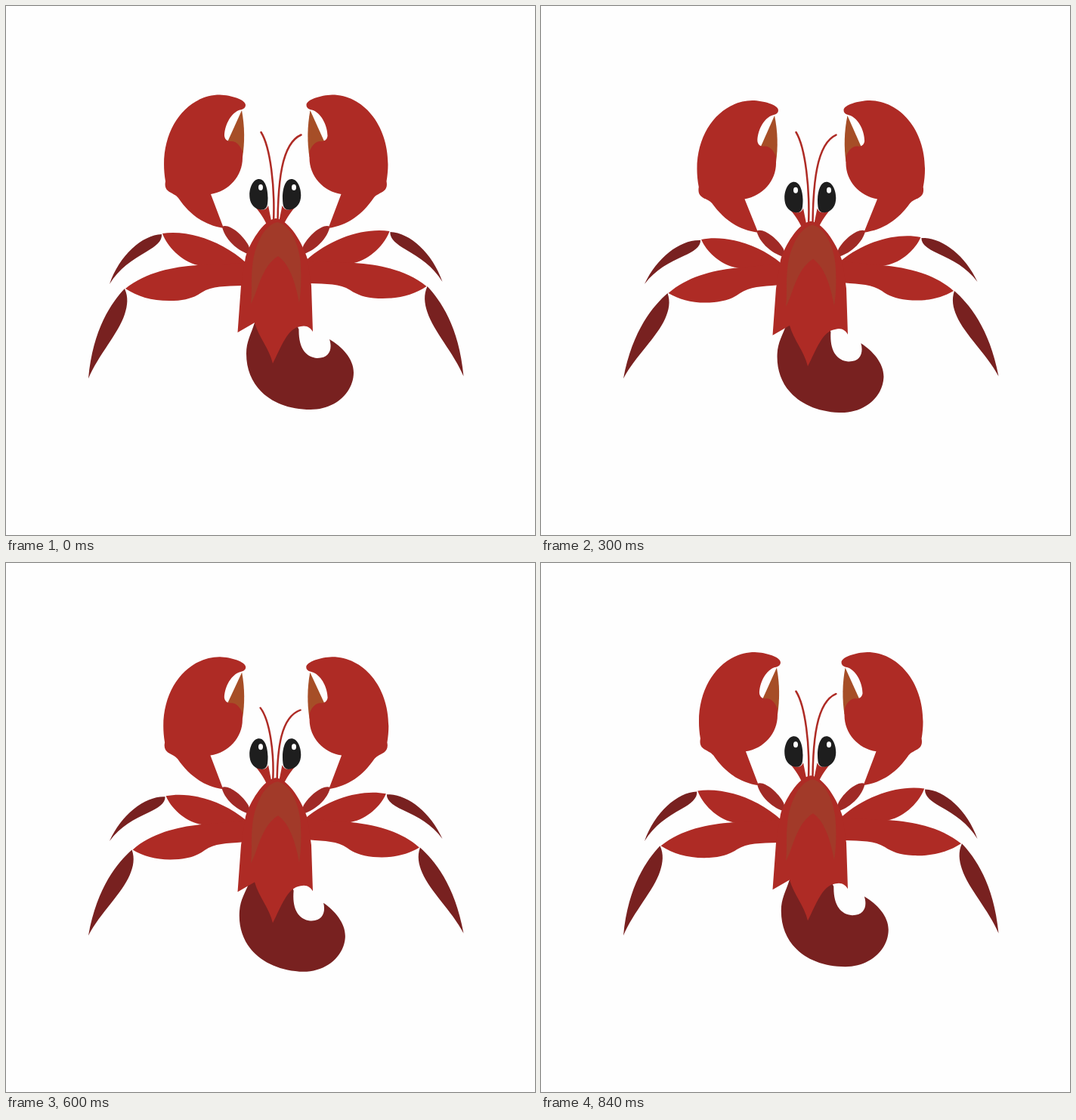
Recreate the animation shown at these times as an HTML page. Size 700 by 700 pixels, loop 0.87 s.

```html
<!DOCTYPE html>
<html lang="en">
<head>
<meta charset="utf-8">
<title>Dancing lobster</title>
<style>
  html, body { margin: 0; width: 100%; height: 100%; overflow: hidden; background: #fefefe; }
  svg { display: block; width: 100vw; height: 100vh; fill: #ae2b25; }
  .dark { fill: #782120; }
  .mirror .legs { transform: translateY(-3px); }
  .mirror .eye { transform: translateX(2px); }
</style>
</head>
<body>
<svg viewBox="0 0 700 700">
  <path id="tail" class="dark" d="M329 419C324 435 318 444 318 460C318 506 354 534 403 534C436 534 460 511 460 485C460 467 445 451 428 441C432 453 429 466 412 466C397 465 387 453 387.500 428L375 400H335Z"/>

  <g class="side">
    <g class="legs">
      <path class="thigh1" d="M207 301C240 296 285 310 318 340V360L254 343C232 338 213 318 207 301Z"/>
      <path class="thigh2" d="M158 374C185 352 222 345 253 343L318 340L313 370C290 371 273 370 259 379C250 385 240 389 222 390C195 391 175 385 158 374Z"/>
      <path class="shin1 dark" d="M206 302C180 303 150 330 137 368C150 347 167 336 186 325C198 318 207 311 206 302Z"/>
      <path class="shin2 dark" d="M157 374C140 392 115 427 109 493C122 462 149 433 157 408C161 396 162 385 157 374Z"/>
    </g>
    <g class="bob">
      <path class="arm" fill="#a02a26" d="M286 292C294 287 313 302 321 317L325 329C313 328 290 312 286 292Z"/>
    </g>
    <g class="claw">
      <path fill="#a64e27" d="M312 138L293 180L313 200C316 180 316 160 312 138Z"/>
      <path d="M211 232C200 168 237 117.500 283 117.500C298 118 317 124 317 131C317 136 312 137 308 138C296 143 289 160 289 172C290 178 294 179 297 179C304 178 310 184 313 193V201C313 225 295 245 271 249L288 294C262 290 243 276 228 254C222 246 208 248 211 232Z"/>
    </g>
  </g>

  <g id="antennae" fill="none" stroke="#ae2b25" stroke-width="2.5" stroke-linecap="round">
    <path d="M337.500 167C350 187 356 240 354 286"/>
    <path d="M390.500 170.500C364 182 360 235 359.500 286"/>
  </g>

  <g class="bob">
    <g class="side">
      <g class="eye">
        <path d="M330 266C338 271 344 271 347 264L351 284L346 292C343 283 337 275 330 266Z"/>
        <path fill="#1e1e1e" d="M335 229C326 229 321 243 322.500 254C323.500 263 330 269 337 269.500C342 270 345 268 346 262C348 246 344 229 335 229Z"/>
      </g>
    </g>
    <g fill="#fefefe">
      <ellipse cx="337" cy="240" rx="3" ry="4"/>
      <ellipse cx="381" cy="240" rx="3" ry="4"/>
    </g>
    <path d="M357 281C340 283 322 315 317 332L311 370L306.500 432L329 419C335 440 348 452 353 473C364 452 372 426 390 424C398 422 403 426 406 431L404 370L399 335C393 315 375 283 357 281Z"/>
    <path fill="#a23a29" d="M359 286C340 290 328 320 326 345C324 360 326 375 324 394C333 380 337 345 360 331C376 342 384 370 388 393C390 380 391 365 390 345C390 325 380 290 359 286Z"/>
  </g>
</svg>
<script>
const LOOP = 870, STEP = 30;
const TILT = [[0, 0], [120, -0.7], [240, -1], [360, -0.8], [600, 0.25], [720, 0], [LOOP, 0]];

for (const side of document.querySelectorAll('.side')) {
  const twin = side.cloneNode(true);
  twin.setAttribute('class', 'mirror');
  twin.setAttribute('transform', 'matrix(-1 0 0 1 714.5 0)');
  side.after(twin);
}

const put = (selector, transform) => document.querySelectorAll(selector)
  .forEach(el => el.setAttribute('transform', transform));

// Rises from start to peak, then falls until the end of the loop.
const ramp = (t, start, peak) =>
  Math.max(0, t < peak ? (t - start) / (peak - start) : (LOOP - t) / (LOOP - peak));
const smooth = u => (1 - Math.cos(Math.PI * u)) / 2;

function sample(keys, t) {
  const i = keys.findIndex(k => k[0] > t);
  const [t0, a] = keys[i - 1], [t1, b] = keys[i];
  return a + (b - a) * (t - t0) / (t1 - t0);
}

// Turns and scales about a fixed root so that the joint moves by (dx, dy).
function swing(selector, [rx, ry], [jx, jy], dx, dy) {
  const x = jx - rx, y = jy - ry, len = x * x + y * y;
  const c = 1 + (dx * x + dy * y) / len, s = (dy * x - dx * y) / len;
  put(selector, `matrix(${c} ${s} ${-s} ${c} ${rx - c * rx + s * ry} ${ry - s * rx - c * ry})`);
}

function draw(t) {
  const u = ramp(t, 0, 440), e = (u + smooth(u)) / 2;
  const bob = 5 * e;
  const curl = smooth(ramp(t, 0, 555));
  const droop = ramp(t, 345, 555);

  put('.bob', `translate(0 ${bob})`);
  put('#tail', `translate(0 ${4 * curl}) rotate(${4.4 * curl} 357 335)`);
  put('#antennae', `translate(${-droop} ${284 + bob}) `
    + `scale(1 ${(118 + bob - 29 * droop) / 118}) translate(0 -284)`);
  put('.claw', `translate(${287 - e} ${293 + 8 * e}) rotate(${sample(TILT, t)}) `
    + `scale(${1 + 0.01 * e} ${1 - 0.013 * e}) translate(-287 -293)`);

  swing('.arm', [324, 328], [287, 292], -e, 3 * e);
  swing('.thigh1', [316, 345], [207, 301], 7 * e, 11 * e);
  swing('.shin1', [137, 368], [206, 302], 7 * e, 11 * e);
  swing('.thigh2', [313, 357], [158, 374], 14.5 * e, 8.3 * e);
  swing('.shin2', [109, 493], [157, 374], 14.5 * e, 8.3 * e);
}

function tick() {
  draw(Math.floor(performance.now() % LOOP / STEP) * STEP);
  requestAnimationFrame(tick);
}
tick();
</script>
</body>
</html>
```
